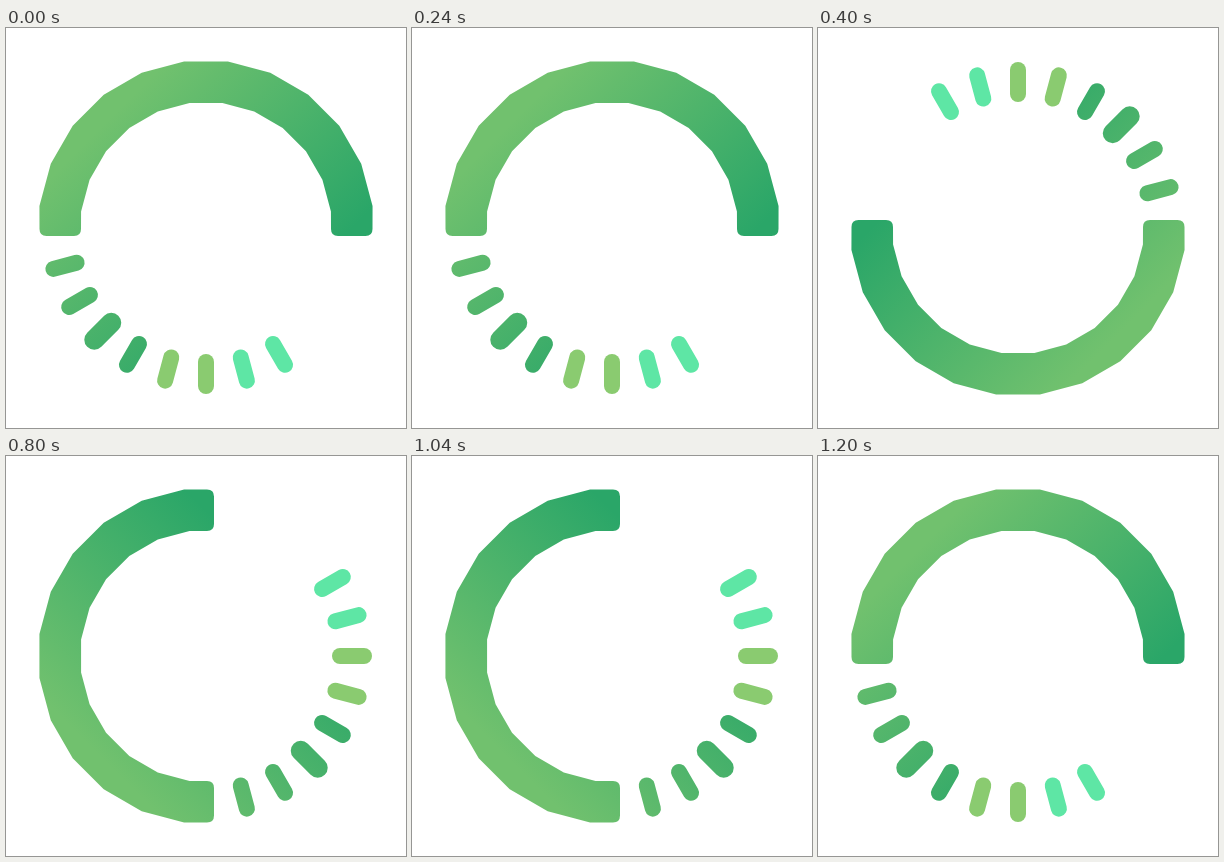
Write an HTML page that moves like this. It is 400 by 400 pixels and loops after 1600 ms.

```html
<!DOCTYPE html>
<html lang="en">
<head>
<meta charset="utf-8">
<title>Spinner</title>
<style>
  html, body { margin: 0; width: 100%; height: 100%; overflow: hidden; background: #fff; }
  svg { display: block; width: 100%; height: 100%; }
</style>
</head>
<body>
<svg viewBox="0 0 400 400">
  <defs>
    <linearGradient id="leaf" gradientUnits="userSpaceOnUse" x1="97" y1="97" x2="273" y2="273">
      <stop offset="0" stop-color="#71c16e"/>
      <stop offset="1" stop-color="#2aa668"/>
    </linearGradient>
  </defs>
  <g id="spinner"></g>
</svg>
<script>
  const STEP_MS = 400;
  const TURNS = [0, 180, 270, 0];
  const LIME = '#8acb70', MINT = '#5ee6a5', LEAF = 'url(#leaf)';
  const spinner = document.getElementById('spinner');

  // Angles run clockwise from the right, in degrees.
  function polar(radius, degrees) {
    const angle = degrees * Math.PI / 180;
    return `${200 + radius * Math.cos(angle)} ${200 + radius * Math.sin(angle)}`;
  }

  function addPath(attributes) {
    const path = document.createElementNS('http://www.w3.org/2000/svg', 'path');
    for (const [name, value] of Object.entries(attributes)) path.setAttribute(name, value);
    spinner.append(path);
  }

  // Half ring with faceted edges, one facet per 15 degrees.
  function addRing() {
    const corners = Array.from({ length: 12 }, (_, i) => 187.5 + 15 * i);
    const edge = (radius, angles) => angles.map(a => 'L' + polar(radius, a)).join('');
    addPath({
      fill: LEAF,
      d: 'M33.5 201' + edge(168, corners) + 'L366.5 201q0 7-7 7H332q-7 0-7-7'
        + edge(126, corners.reverse()) + 'L75 201q0 7-7 7H40.5q-7 0-7-7Z'
    });
  }

  function addDash(degrees, color, width = 16) {
    addPath({
      d: `M${polar(134, degrees)}L${polar(158, degrees)}`,
      stroke: color,
      'stroke-width': width,
      'stroke-linecap': 'round'
    });
  }

  addRing();
  [MINT, MINT, LIME, LIME, LEAF].forEach((color, i) => addDash(60 + 15 * i, color));
  addDash(135, LEAF, 20);
  addDash(150, LEAF);
  addDash(165, LEAF);

  const start = performance.now();
  function draw() {
    const step = Math.floor((performance.now() - start) / STEP_MS) % TURNS.length;
    spinner.setAttribute('transform', `rotate(${TURNS[step]} 200 200)`);
    requestAnimationFrame(draw);
  }
  draw();
</script>
</body>
</html>
```
